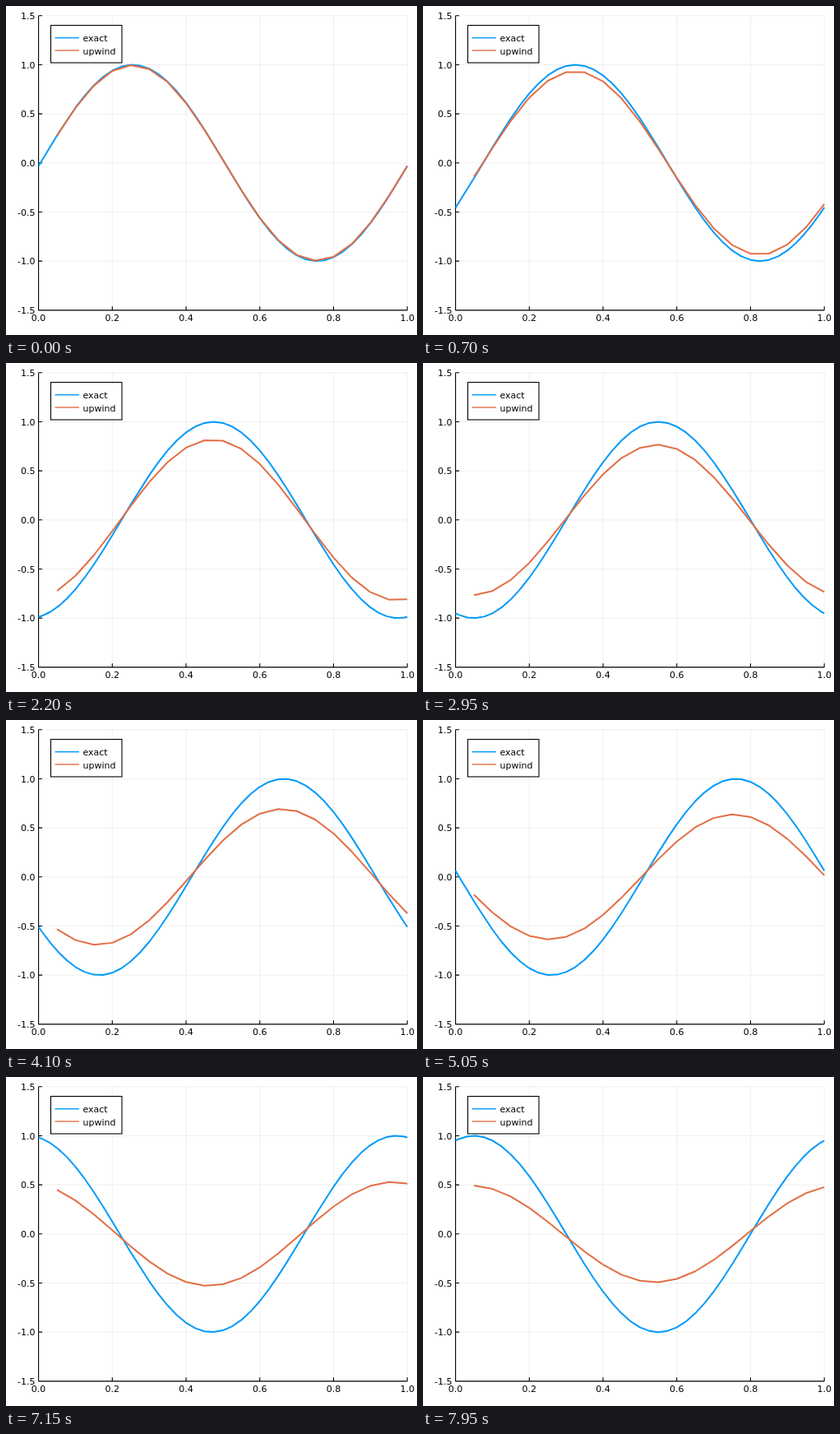
Recreate the animation shown at these times as an HTML page. Size 500x400 px, loop 8000 ms.

```html
<!DOCTYPE html>
<html lang="en">
<head>
<meta charset="utf-8">
<title>Advection: exact and upwind</title>
<style>
  html, body { margin: 0; width: 100%; height: 100%; overflow: hidden; background: #fff; }
  svg { display: block; }
  text { font: 11px "DejaVu Sans", sans-serif; fill: #000; }
  path { fill: none; stroke-linejoin: round; }
  .grid { stroke: #000; stroke-opacity: .065; }
  .axis { stroke: #000; stroke-width: 1.1; }
  .exact { stroke: #009afa; }
  .upwind { stroke: #e26f46; }
  .curve { stroke-width: 2; }
  .key { stroke-width: 1.4; }
</style>
</head>
<body>
<svg width="500" height="400" viewBox="0 0 500 400">
  <path class="grid" id="grid"/>
  <path class="axis" id="axis"/>
  <g id="labels"></g>
  <path class="exact curve" id="exact"/>
  <path class="upwind curve" id="upwind"/>
  <rect x="54.5" y="23.5" width="86.5" height="45.5" fill="#fff" stroke="#000" stroke-width="1.1"/>
  <path class="exact key" d="M59.5 38.7H89"/>
  <path class="upwind key" d="M59.5 54H89"/>
  <text x="93.5" y="43">exact</text>
  <text x="93.5" y="58.5">upwind</text>
</svg>
<script>
const FRAME_MS = 50, FRAMES = 160;
const DX = 0.05, COURANT = 0.1, SHIFT = COURANT * DX;
const TAU = 2 * Math.PI;
const byId = id => document.getElementById(id);
const px = x => 39.6 + 448.6 * x;
const py = y => 190.8 - 119.35 * y;
const toPath = points =>
  "M" + points.map(([x, y]) => px(x).toFixed(2) + " " + py(y).toFixed(2)).join("L");

function drawAxes() {
  const left = px(0), right = px(1), top = py(1.5), bottom = py(-1.5);
  let grid = "", axis = `M${left} ${top}V${bottom}H${right}`, labels = "";
  for (let i = 0; i <= 5; i++) {
    const x = px(i / 5);
    grid += `M${x} ${top}V${bottom}`;
    axis += `M${x} ${bottom}v-4.5`;
    labels += `<text x="${x}" y="383" text-anchor="middle">${(i / 5).toFixed(1)}</text>`;
  }
  for (let i = -3; i <= 3; i++) {
    const y = py(i / 2);
    grid += `M${left} ${y}H${right}`;
    axis += `M${left} ${y}h4.5`;
    labels += `<text x="35.5" y="${y + 4.2}" text-anchor="end">${(i / 2).toFixed(1)}</text>`;
  }
  byId("grid").setAttribute("d", grid);
  byId("axis").setAttribute("d", axis);
  byId("labels").innerHTML = labels;
}

// Coarse intervals, split in two wherever the curve bends strongly.
function exactPoints(step) {
  const f = x => Math.sin(TAU * (x - SHIFT * step));
  const bends = (a, m, b) => {
    const size = (Math.abs(f(a)) + 2 * Math.abs(f(m)) + Math.abs(f(b))) / 4;
    return TAU ** 2 * size * (b - a) ** 2 / 2 > 0.05;
  };
  const xs = [0];
  const add = (a, m, b, split = bends(a, m, b)) => {
    if (!split) return xs.push(m, b);
    add(a, (a + m) / 2, m);
    add(m, (m + b) / 2, b);
  };
  // The end intervals follow the decision of their neighbours.
  add(0, 0.0098, 0.1, bends(0.1, 0.15, 0.2));
  for (let i = 1; i < 9; i++) add(i / 10, i / 10 + 0.05, (i + 1) / 10);
  add(0.9, 0.9875, 1, bends(0.8, 0.85, 0.9));
  return xs.map(x => [x, f(x)]);
}

// A sine stays a sine under the upwind scheme: each step damps and delays it.
function upwindPoints(step) {
  const re = 1 - COURANT + COURANT * Math.cos(TAU * DX);
  const im = COURANT * Math.sin(TAU * DX);
  const amplitude = Math.hypot(re, im) ** step;
  const delay = Math.atan2(im, re) * step;
  return Array.from({ length: 20 }, (_, i) => {
    const x = (i + 1) * DX;
    return [x, amplitude * Math.sin(TAU * x - delay)];
  });
}

function draw() {
  const step = Math.floor(performance.now() / FRAME_MS) % FRAMES + 1;
  byId("exact").setAttribute("d", toPath(exactPoints(step)));
  byId("upwind").setAttribute("d", toPath(upwindPoints(step)));
  requestAnimationFrame(draw);
}

drawAxes();
draw();
</script>
</body>
</html>
```
